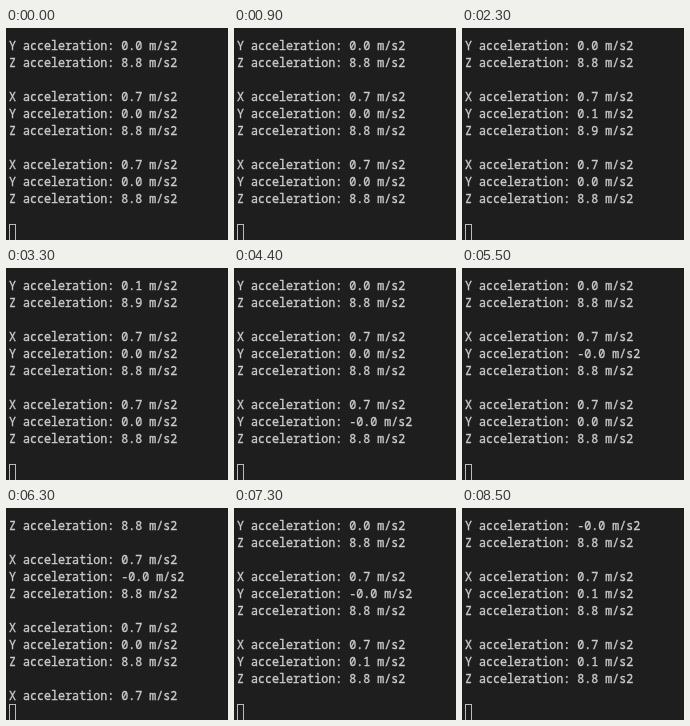
An HTML page for the animation above (8.9 s loop, 222x212 px).

```html
<!DOCTYPE html>
<html lang="en">
<head>
<meta charset="utf-8">
<title>Acceleration log</title>
<style>
  html, body {
    margin: 0;
    width: 100%;
    height: 100%;
    overflow: hidden;
    background: #1e1e1e;
  }
  /* eleven full rows; the twelfth holds only the cursor */
  .view {
    position: absolute;
    left: 0;
    top: 9px;
    width: 222px;
    height: 187px;
    overflow: hidden;
  }
  .log {
    --row: -17px;
    margin: 0 0 0 3px;
    color: #ccc;
    font: 11.7px/17px "Noto Sans Mono", "DejaVu Sans Mono", monospace;
    -webkit-text-stroke: 0.35px #ccc;
    white-space: pre;
    animation: scroll 8.9s step-end infinite;
  }
  .cursor {
    position: absolute;
    left: 3px;
    top: 196px;
    width: 7px;
    height: 17px;
    box-sizing: border-box;
    border: 1px solid #bbb;
  }
  /* four rows per reading; some readings pause after their first row */
  @keyframes scroll {
    0%     { transform: translateY(0); }
    14.60% { transform: translateY(calc(var(--row) * 4)); }
    25.84% { transform: translateY(calc(var(--row) * 8)); }
    37.07% { transform: translateY(calc(var(--row) * 12)); }
    48.31% { transform: translateY(calc(var(--row) * 16)); }
    59.55% { transform: translateY(calc(var(--row) * 17)); }
    60.67% { transform: translateY(calc(var(--row) * 20)); }
    70.78% { transform: translateY(calc(var(--row) * 21)); }
    71.91% { transform: translateY(calc(var(--row) * 24)); }
    82.02% { transform: translateY(calc(var(--row) * 28)); }
    94.38%, 100% { transform: translateY(calc(var(--row) * 32)); }
  }
</style>
</head>
<body>
<div class="view"><pre class="log" id="log"></pre></div>
<div class="cursor"></div>
<script>
  const yValues = ['0.0', '0.0', '0.0', '0.1', '0.0', '0.0', '-0.0', '0.0', '-0.0', '0.1', '0.1'];
  const line = (axis, value) => `${axis} acceleration: ${value} m/s2\n`;
  const reading = (y, i) =>
    line('X', '0.7') + line('Y', y) + line('Z', i === 3 ? '8.9' : '8.8') + '\n';

  // The first X row has already scrolled out of view.
  const text = yValues.map(reading).join('');
  document.getElementById('log').textContent = text.slice(text.indexOf('Y'));
</script>
</body>
</html>
```
